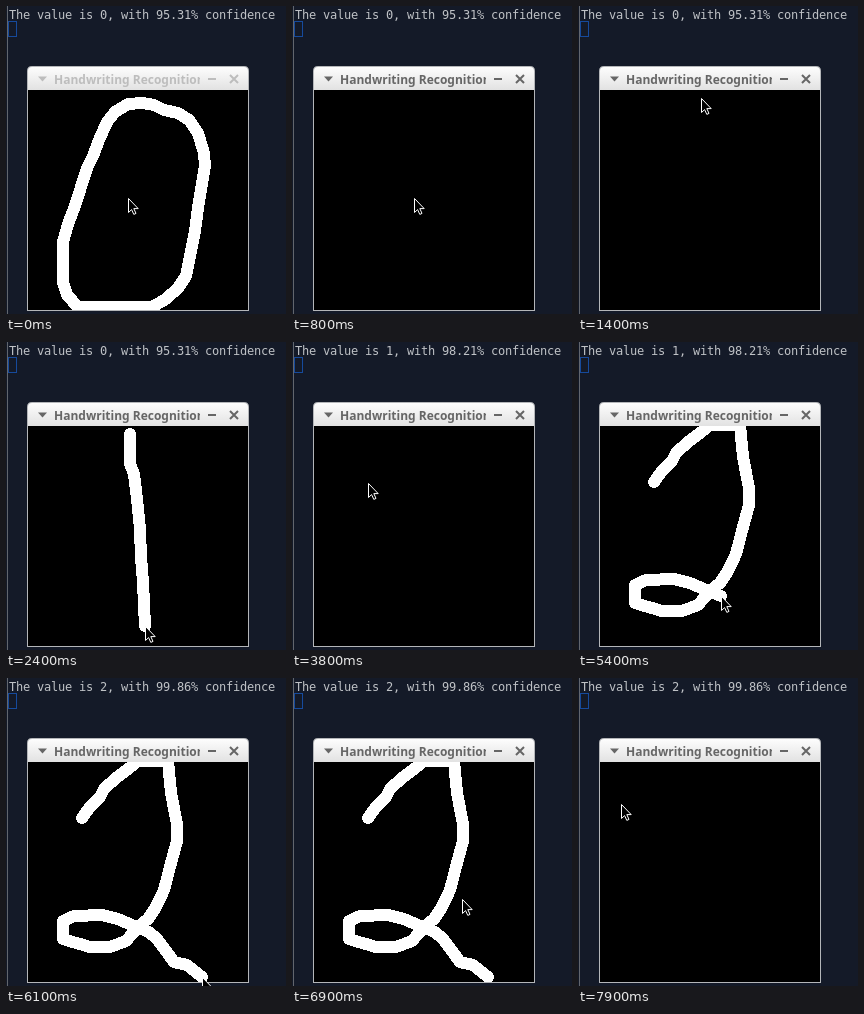
An HTML page that plays this animation: 280x308 px, repeating every 8 s.

```html
<!DOCTYPE html>
<html lang="en">
<head>
<meta charset="utf-8">
<title>Handwriting Recognition</title>
<style>
  html, body { margin: 0; width: 100%; height: 100%; overflow: hidden; background: #141a28; }
  svg { display: block; }
  .console { font: 12px "DejaVu Sans Mono", monospace; letter-spacing: -.225px; fill: #bfc2c6; white-space: pre; }
  .title { font: bold 12px "Noto Sans", "Open Sans", sans-serif; }
  .controls { color: #666; fill: currentColor; }
  .controls.inactive { color: #bdbdbd; }
  .ink path { fill: none; stroke: #fff; stroke-width: 12; stroke-linecap: round; stroke-linejoin: round; shape-rendering: crispEdges; }
</style>
</head>
<body>
<svg width="100%" height="100%" viewBox="0 0 280 308">
  <defs>
    <linearGradient id="bar" x2="0" y2="1">
      <stop stop-color="#fdfdfd"/>
      <stop offset="1" stop-color="#e2e2e2"/>
    </linearGradient>
    <clipPath id="pad"><rect x="22" y="84" width="220" height="220"/></clipPath>
  </defs>

  <rect width="280" height="308" fill="#141a28"/>
  <rect x="1" width="1" height="308" fill="#62666d"/>
  <text class="console" id="result" x="3" y="13"></text>
  <rect x="2.5" y="15.5" width="8" height="15" fill="none" stroke="#164a9c"/>

  <path d="M21 305V65q0-5 5-5H238q5 0 5 5V305Z" fill="#b4b6b9"/>
  <path d="M22 84V65q0-4 4-4H238q4 0 4 4V84Z" fill="url(#bar)"/>
  <rect x="22" y="84" width="220" height="220"/>
  <g class="controls" id="controls">
    <path d="M32 70.5H41L36.5 75.5Z"/>
    <svg x="48" y="61" width="146" height="22"><text class="title" y="17">Handwriting Recognition</text></svg>
    <rect x="202" y="72" width="8" height="2"/>
    <path d="M224 69l8 8m0-8l-8 8" stroke="currentColor" stroke-width="2"/>
  </g>

  <g class="ink" id="ink" clip-path="url(#pad)"></g>
  <path id="pointer" d="M.5.5V14.5L3.6 11.6 5.8 16.4 8 15.4 5.8 10.6H10.2Z" fill="#000" stroke="#fff"/>
</svg>
<script>
  const LOOP = 8000, STEP = 100;
  const $ = id => document.getElementById(id);

  // Each move runs from its first to its last step; those with a clear time leave ink.
  const moves = [
    { from: -100, to: -100, clear: 800, still: true,
      d: 'M136 97L122 98 109 106 101 116 93 134 87 150 82 160 75 181 69 200 62 218 57 236V276L61 289 72 301H146L160 293 172 282 180 270 185 245 189 225 192 202 196 178 199 160 198 147 192 127 183 114 172 107 158 104 148 99Z' },
    { from: 900, to: 1400, d: 'M122 192L123 92' },
    { from: 1800, to: 2400, clear: 3300,
      d: 'M124 92V122L128 132 131 157 134 187 135 215 137 240 139 284' },
    { from: 3000, to: 3700, d: 'M139 284L85 141' },
    { from: 3800, to: 3800, d: 'M85 141H76' },
    { from: 4200, to: 5000, clear: 7400,
      d: 'M76 140L84 129 94 119 98 111 110 100 122 91 132 83H162L165 115 171 146V163L165 185 158 212 150 229 142 241 133 248 120 263 104 269H92' },
    { from: 5100, to: 5400, clear: 7400,
      d: 'M92 269H83L74 266 63 263 57 261V243L68 238 96 237 112 241 128 248 143 254' },
    { from: 5500, to: 5800, clear: 7400,
      d: 'M143 254L151 261 160 273 168 284 181 287 196 299' },
    { from: 6300, to: 6300, d: 'M195 300V316' },
    { from: 6500, to: 6900, d: 'M205 316L161 246 170 221' },
    { from: 7600, to: 7900, d: 'M170 221L43 126' }
  ];
  const results = [
    [0, '0, with 95.31%'],
    [2900, '1, with 98.21%'],
    [6100, '2, with 99.86%']
  ];

  for (const move of moves) {
    move.path = document.createElementNS('http://www.w3.org/2000/svg', 'path');
    move.path.setAttribute('d', move.d);
    move.length = move.path.getTotalLength();
    if (move.clear) $('ink').append(move.path);
  }

  function draw(now) {
    const t = Math.floor(now % LOOP / STEP) * STEP;
    let tip = { x: 122, y: 192 };
    for (const { from, to, clear, still, path, length } of moves) {
      const done = Math.min(1, (t - from + STEP) / (to - from + STEP));
      const started = t >= from;
      if (started && !still) tip = path.getPointAtLength(length * done);
      if (clear) {
        path.style.display = started && t < clear ? '' : 'none';
        path.style.strokeDasharray = done < 1 ? `${Math.max(0, length * done)} 2000` : 'none';
      }
    }
    $('pointer').setAttribute('transform', `translate(${Math.round(tip.x)} ${Math.round(tip.y)})`);
    $('controls').classList.toggle('inactive', t < 800);
    const value = results.filter(([start]) => t >= start).pop()[1];
    $('result').textContent = `The value is ${value} confidence`;
  }

  let start;
  function tick(now) {
    start ??= now;
    draw(now - start);
    requestAnimationFrame(tick);
  }
  draw(0);
  requestAnimationFrame(tick);
</script>
</body>
</html>
```
